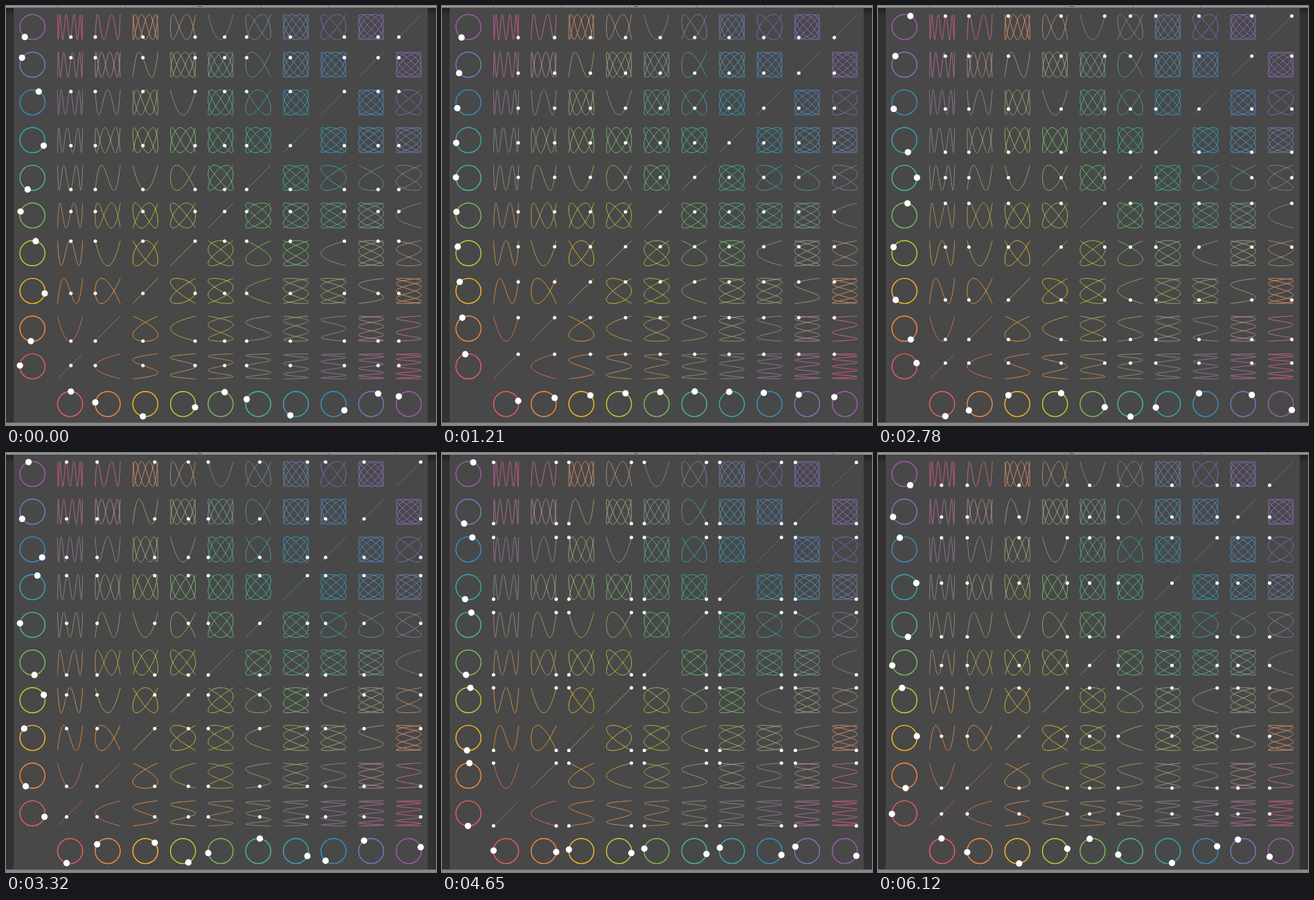
An HTML page with a canvas for the animation above (6.21 s loop, 621 px wide and 604 px high).

```html
<!DOCTYPE html>
<html lang="en">
<head>
<meta charset="utf-8">
<title>Lissajous table</title>
<style>
  html, body { margin: 0; width: 100%; height: 100%; overflow: hidden; background: #484848; }
  canvas { display: block; }
</style>
</head>
<body>
<canvas id="stage" width="621" height="604"></canvas>
<script>
const W = 621, H = 604, LOOP = 6210;
const COUNT = 10, PITCH = 54.35, RADIUS = 18.1;
const LEFT = 38.2, TOP = 30.3;
const TAU = Math.PI * 2;

// The angle advances in bursts of nine quick steps, each followed by a longer hold.
const FIRST_STEP = 60, BURST = 700, STEP = 74, BURST_STEPS = 9, LAST_STEP = 79;
const START_ANGLE = -86.25, STEP_ANGLE = 4.475;

const PALETTE = [
  '#f05c62', '#f68c42', '#fbbc1e', '#c4cf36', '#7ac058',
  '#4abe8c', '#34acb0', '#3492c8', '#6c80c8', '#a45ab2'
];

const canvas = document.getElementById('stage');
const ctx = canvas.getContext('2d');
const backdrop = document.createElement('canvas');
backdrop.width = W;
backdrop.height = H;

const colX = k => LEFT + k * PITCH;
const rowY = k => TOP + (COUNT - k) * PITCH;
const gcd = (a, b) => b ? gcd(b, a % b) : a;
const channels = hex => [1, 3, 5].map(i => parseInt(hex.slice(i, i + 2), 16));

function blend(a, b) {
  const other = channels(b);
  return `rgb(${channels(a).map((v, i) => Math.round((v + other[i]) / 2)).join(',')})`;
}

function ring(g, x, y, color) {
  g.beginPath();
  g.arc(x, y, RADIUS, 0, TAU);
  g.strokeStyle = color;
  g.lineWidth = 1.4;
  g.stroke();
}

// Traced only until it would run back over itself, so that the line stays thin.
function curve(g, col, row) {
  const cx = colX(col), cy = rowY(row);
  const end = Math.PI / gcd(col, row), samples = 240;
  g.beginPath();
  for (let i = 0; i <= samples; i++) {
    const p = end * i / samples;
    g.lineTo(cx + RADIUS * Math.cos(col * p), cy - RADIUS * Math.cos(row * p));
  }
  g.strokeStyle = blend(PALETTE[col - 1], PALETTE[row - 1]);
  g.lineWidth = 0.95;
  g.stroke();
}

function paintBackdrop(g) {
  const fill = (color, x, y, w, h) => {
    g.fillStyle = color;
    g.fillRect(x, y, w, h);
  };
  const side = g.createLinearGradient(0, 2, 0, 14);
  side.addColorStop(0, '#1e1e1e');
  side.addColorStop(1, '#323232');

  fill('#484848', 0, 0, W, H);
  fill(side, 0, 0, 11, H);
  fill(side, 609, 0, 12, H);
  fill('#989898', 0, 0, W, 2);
  fill('#5c5c5c', 0, 2, W, 1);
  for (let x = 74; x < W; x += 98) fill('#666', x, 0, 1, 2);
  fill('#484848', 277, 0, 6, 1);
  fill('#5c5c5c', 0, 600, W, 1);
  fill('#888', 0, 601, W, 3);

  for (let k = 1; k <= COUNT; k++) {
    ring(g, colX(k), rowY(0), PALETTE[k - 1]);
    ring(g, LEFT, rowY(k), PALETTE[k - 1]);
    for (let row = 1; row <= COUNT; row++) curve(g, k, row);
  }
}

function stepAt(time) {
  const t = time - FIRST_STEP;
  if (t < 0) return 0;
  const burst = Math.floor(t / BURST);
  const inBurst = Math.min(BURST_STEPS, 1 + Math.floor((t % BURST) / STEP));
  return Math.min(LAST_STEP, burst * BURST_STEPS + inBurst);
}

function dot(x, y, r) {
  ctx.beginPath();
  ctx.arc(x, y, r, 0, TAU);
  ctx.fill();
}

function render(time) {
  const phase = (START_ANGLE + STEP_ANGLE * stepAt(time % LOOP)) * Math.PI / 180;
  const cos = k => RADIUS * Math.cos(k * phase);
  const sin = k => RADIUS * Math.sin(k * phase);

  ctx.drawImage(backdrop, 0, 0);
  ctx.fillStyle = '#fff';
  for (let k = 1; k <= COUNT; k++) {
    dot(colX(k) + cos(k), rowY(0) + sin(k), 4.6);
    dot(LEFT + sin(k), rowY(k) - cos(k), 4.6);
    for (let row = 1; row <= COUNT; row++) {
      dot(colX(k) + cos(k), rowY(row) - cos(row), 2.5);
    }
  }
}

paintBackdrop(backdrop.getContext('2d'));
const start = performance.now();
function tick() {
  render(performance.now() - start);
  requestAnimationFrame(tick);
}
tick();
</script>
</body>
</html>
```
